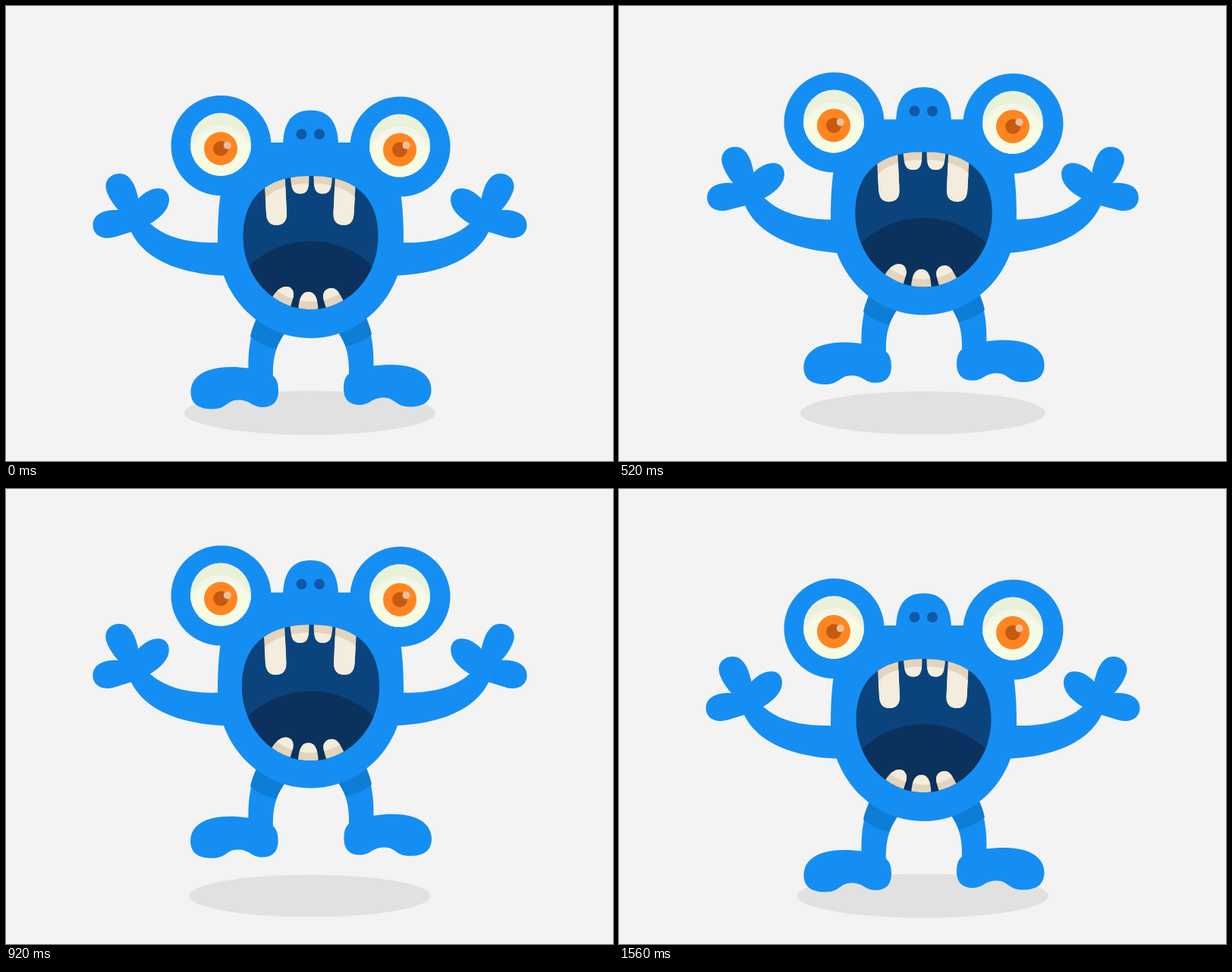
An HTML page that plays this animation: 800x600 px, repeating every 2040 ms.

```html
<!DOCTYPE html>
<html lang="en">
<head>
<meta charset="utf-8">
<title>Jumping monster</title>
<style>
html, body { margin: 0; height: 100%; overflow: hidden; background: #f3f3f3; }
svg { display: block; width: 100vw; height: 100vh; }
</style>
</head>
<body>
<svg viewBox="0 0 800 600" fill="#158ef3">
  <defs>
    <path id="mouth" d="M312.5 304C312.5 255 340 224 401.5 224S490.5 255 490.5 304C490.5 357 451 400 401.5 400S312.5 357 312.5 304Z"/>
    <clipPath id="lips"><use href="#mouth"/></clipPath>
    <clipPath id="lit"><use href="#mouth" transform="translate(401.5 312) scale(.885) translate(-401.5 -312)"/></clipPath>
    <g id="teeth">
      <path id="fang" d="M340 220L343 274Q344 289 356 289Q370 289 370 274L367.5 220Z"/>
      <use href="#fang" transform="translate(801.5) scale(-1 1)"/>
      <path id="tooth" d="M374.5 220C376 240 377 247.5 388 247.5S399.5 238 399.5 220Z"/>
      <use href="#tooth" transform="translate(805) scale(-1 1)"/>
      <path d="M350 386C356 374 364 370 369 370C376 370 379 375 379 380C379 387 375 393 374 402H350Z"/>
      <path d="M385 402C386 385 390 377 398.5 377S411 385 411.5 402Z"/>
      <path d="M423 402C420 392 418 387 418 381C419 375 424 372 429 372C437 372 440 380 447 393V402Z"/>
    </g>
    <g id="leg">
      <path d="M335 400C322 430 318 455 320 488L352 492C351 460 357 445 372 425Z"/>
      <path fill="#0e7dd5" d="M335 400C329 415 324 425 322 436Q338 449 356 452Q361 440 372 425Z"/>
      <path class="foot" d="M320 477.5C270 471 243.5 485 243.5 509C243.5 526 256 531.5 271 531.5C292 531.5 290 519.5 307 519.5C322 519.5 324 529 338 529C352 529 359 521 359 508C359 498 357 491 351 487Z"/>
    </g>
    <path id="arm" d="M165 298C150 302 142 306 134 306C121 306 114.5 298 114.5 289C114.5 275 128 268 148 269C138 258 131.5 245 131.5 238C131.5 227 140 221 150 221C164 221 171 237 174.5 254C184 244 194 240 202 240.5C210 241 215 247 215 255C215 269 202 280 190 287C210 305 240 313 279 312H310V356L286 355.5C230 353 183 335 165 298Z"/>
    <clipPath id="ball"><ellipse cx="283" cy="182.5" rx="40" ry="41.5"/></clipPath>
    <g id="eye">
      <circle cx="283.5" cy="184" r="66"/>
      <g clip-path="url(#ball)">
        <rect x="240" y="140" width="86" height="86" fill="#e9f1d9"/>
        <ellipse cx="283" cy="198" rx="42" ry="41" fill="#f3f4ea"/>
        <ellipse cx="283" cy="206" rx="44" ry="42" fill="#f6fbe4"/>
      </g>
      <circle cx="283" cy="188" r="22" fill="#ff8521"/>
      <circle cx="283" cy="188" r="10" fill="#c55a10"/>
    </g>
  </defs>

  <rect width="800" height="600" fill="#f3f3f3"/>
  <ellipse id="shadow" cx="400.5" cy="536.5" rx="165.5" ry="29" fill="#e1e1e1"/>

  <g id="legs">
    <use href="#leg"/>
    <use href="#leg" transform="translate(804 -3) scale(-1 1)"/>
  </g>

  <g id="body">
    <use href="#arm"/>
    <use href="#arm" transform="translate(801) scale(-1 1)"/>
    <path d="M279 310C279 265 283 230 295 200Q320 180 345 180H458Q490 180 508 200C520 230 524 265 524 310C524 381 469 438 401.5 438S279 381 279 310Z"/>
    <path d="M365 186C365 152 378 137.5 401.5 137.5S438 152 438 186Z"/>
    <g fill="#1159a5">
      <circle cx="389.5" cy="169" r="7"/>
      <circle cx="413" cy="169" r="7"/>
    </g>
    <use href="#eye"/>
    <use href="#eye" transform="translate(236 1.5)"/>
    <g fill="#e6c0a0">
      <circle cx="291.8" cy="183.7" r="5"/>
      <circle cx="527.5" cy="183.7" r="5"/>
    </g>
    <g id="lids">
      <circle cx="283.5" cy="184" r="66"/>
      <circle cx="519.5" cy="185.5" r="66"/>
    </g>
    <g id="jaw">
      <g clip-path="url(#lips)">
        <rect x="300" y="215" width="200" height="195" fill="#0b447c"/>
        <circle cx="401.5" cy="428" r="118" fill="#0b325c"/>
        <use href="#teeth" fill="#e2d4bd"/>
        <g clip-path="url(#lit)"><use href="#teeth" fill="#f4ecdc"/></g>
      </g>
    </g>
  </g>
</svg>
<script>
const LOOP = 2040, STEP = 40, PEAK = 99, TOP = 715, FALL = 252;
const $ = id => document.getElementById(id);
const set = (el, value) => el.setAttribute("transform", value);
const ease = u => u * u * (3 - 2 * u);

// Each key is [time, value], eased in and out
function track(t, keys) {
  if (t <= keys[0][0]) return keys[0][1];
  for (let i = 1; i < keys.length; i++) {
    const [t0, a] = keys[i - 1], [t1, b] = keys[i];
    if (t < t1) return a + (b - a) * ease((t - t0) / (t1 - t0));
  }
  return keys[keys.length - 1][1];
}

const scaleAt = (x, y, s) => `translate(${x} ${y}) scale(${s}) translate(${-x} ${-y})`;

function height(t) {
  if (t < TOP) return track(t, [[400, 0], [TOP, PEAK]]);
  return Math.max(0, PEAK * (1 - ((t - TOP) / FALL) ** 2.8));
}

function draw(t) {
  const h = height(t);
  const squat = track(t, [[40, 0], [240, 15.4], [400, 15.4], [550, 0], [960, 0], [1040, 13], [1280, 0]]);
  const arm = track(t, [[40, 0], [240, 7.7], [400, 7.7], [760, -13.3], [800, -13.3], [1040, 13], [1280, 0]]);
  const foot = track(t, [[480, 0], [800, 6.5], [960, 0]]);

  set($("shadow"), scaleAt(400.5, 536.5, 1 - 0.127 * (h / 88) ** 1.67));
  set($("legs"), `translate(0 ${-h})`);
  set($("body"), `translate(0 ${squat - h})`);
  set($("arm"), `rotate(${arm} 273 328)`);
  set(document.querySelector(".foot"), `rotate(${foot} 338 485)`);
  set($("jaw"), scaleAt(401.5, 312, 1 + h * 0.00042));
  $("lids").setAttribute("visibility", t >= 1480 && t < 1560 ? "visible" : "hidden");
}

const start = performance.now();
function tick() {
  const t = (performance.now() - start) % LOOP;
  draw(Math.floor(t / STEP) * STEP);
  requestAnimationFrame(tick);
}
tick();
</script>
</body>
</html>
```
